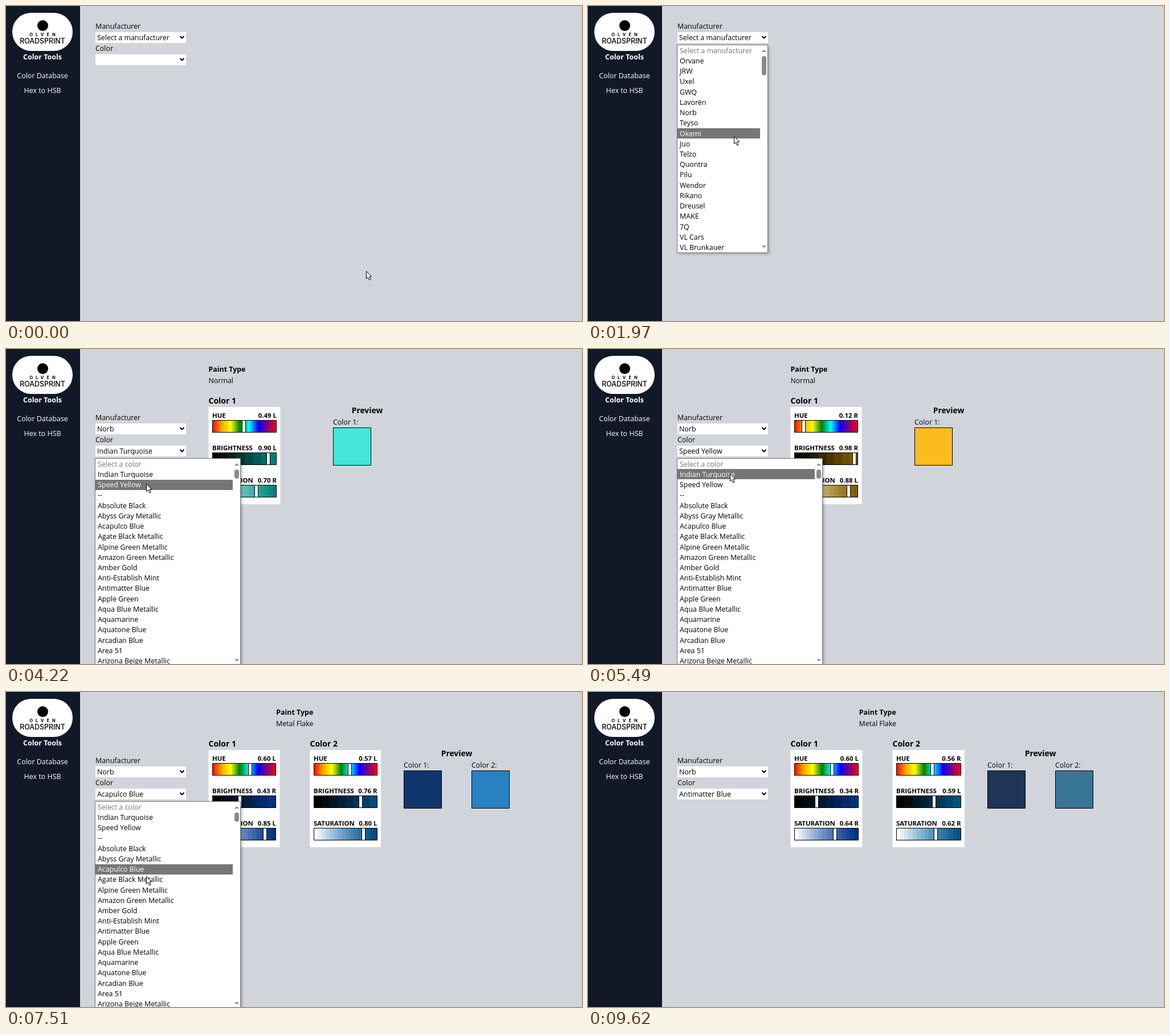
An HTML page with a canvas that plays this animation: 1011x554 px, repeating every 9.64 s.

```html
<!DOCTYPE html>
<html lang="en">
<head>
<meta charset="utf-8">
<title>Color Tools</title>
<style>
  html, body { margin: 0; width: 100%; height: 100%; overflow: hidden; background: #d1d5db; }
  canvas { display: block; }
</style>
</head>
<body>
<canvas id="stage" width="1011" height="554"></canvas>
<script>
const ctx = document.getElementById('stage').getContext('2d');
const LOOP = 9640, STEP = 120, ROW = 18.22, GRAY = '#767676';

const makers = ['Select a manufacturer', 'Orvane', 'JRW', 'Uxel', 'GWQ', 'Lavorën', 'Norb', 'Teyso', 'Okemi',
  'Juo', 'Telzo', 'Quontra', 'Pilu', 'Wendor', 'Rikano', 'Dreusel', 'MAKE', '7Q', 'VL Cars', 'VL Brunkauer'];
const colors = ['Select a color', 'Indian Turquoise', 'Speed Yellow', '--', 'Absolute Black', 'Abyss Gray Metallic',
  'Acapulco Blue', 'Agate Black Metallic', 'Alpine Green Metallic', 'Amazon Green Metallic', 'Amber Gold',
  'Anti-Establish Mint', 'Antimatter Blue', 'Apple Green', 'Aqua Blue Metallic', 'Aquamarine', 'Aquatone Blue',
  'Arcadian Blue', 'Area 51', 'Arizona Beige Metallic'];

// Paints by row in the color list; each coat has a panel width and hue, brightness, saturation
const paints = {
  1: [{ width: 126, hsb: ['0.49 L', '0.90 L', '0.70 R'] }],
  2: [{ width: 125, hsb: ['0.12 R', '0.98 R', '0.88 L'] }],
  6: [{ width: 125, hsb: ['0.60 L', '0.43 R', '0.85 L'] }, { width: 124.5, hsb: ['0.57 L', '0.76 R', '0.80 L'] }],
  12: [{ width: 126, hsb: ['0.60 L', '0.34 R', '0.64 R'] }, { width: 126.5, hsb: ['0.56 R', '0.59 L', '0.62 R'] }]
};

const events = [
  [0, { maker: 0, color: 0, menu: '', focus: '' }],
  [1090, { menu: 'maker' }],
  [2570, { menu: '', focus: 'maker', maker: 6, color: 1 }],
  [3610, { menu: 'color', focus: '' }],
  [4470, { menu: '', focus: 'color', color: 2 }],
  [5250, { menu: 'color', focus: '' }],
  [6130, { menu: '', focus: 'color', color: 6 }],
  [6880, { menu: 'color', focus: '' }],
  [8230, { menu: '', focus: 'color', color: 12 }],
  [9620, { focus: '' }]
];

// Pointer moves: start time, number of steps, end point
const moves = [
  [250, 5, 330, 60], [850, 1, 292, 39], [970, 1, 298, 47],
  [1470, 4, 266, 198], [1970, 1, 256, 229], [2090, 4, 252, 190], [2690, 3, 247, 185],
  [3860, 4, 246, 237], [4720, 2, 244, 227], [4980, 2, 246, 190], [5250, 1, 247, 185],
  [5370, 2, 249, 219], [5610, 1, 249, 251], [5760, 2, 249, 308], [6250, 1, 249, 300],
  [6400, 5, 247, 181], [7130, 2, 246, 289], [7390, 2, 246, 324], [7630, 5, 243, 420], [8730, 2, 461, 487]
];

function pointerAt(t) {
  let x = 632, y = 466;
  for (const [start, steps, endX, endY] of moves) {
    if (t < start) break;
    const done = Math.min(1, (Math.floor((t - start) / STEP) + 1) / steps);
    const eased = Math.sin(done * Math.PI / 2);
    x += (endX - x) * eased;
    y += (endY - y) * eased;
  }
  return { x: Math.round(x), y: Math.round(y) };
}

function stateAt(t) {
  return Object.assign({}, ...events.filter(([start]) => t >= start).map(([, change]) => change));
}

function rect(x, y, w, h, fill) {
  ctx.fillStyle = fill;
  ctx.fillRect(x, y, w, h);
}

function outline(x, y, w, h) {
  ctx.strokeStyle = '#000';
  ctx.lineWidth = 1;
  ctx.strokeRect(x + .5, y + .5, w - 1, h - 1);
}

function pill(x, y, w, h, r, fill) {
  ctx.fillStyle = fill;
  ctx.beginPath();
  ctx.roundRect(x, y, w, h, r);
  ctx.fill();
}

function polygon(points, fill) {
  ctx.beginPath();
  points.forEach(([x, y]) => ctx.lineTo(x, y));
  ctx.closePath();
  ctx.fillStyle = fill;
  ctx.fill();
}

// y is the middle of the capitals
function text(str, x, y, { size = 12.4, weight = 400, color = '#000', align = 'left', family = '"Open Sans"' } = {}) {
  ctx.font = `${weight} ${size}px ${family}, sans-serif`;
  ctx.fillStyle = color;
  ctx.textAlign = align;
  ctx.fillText(str, x, Math.round(y + size * .36));
}

function hsbColor(h, b, s) {
  const channel = n => {
    const k = (n + h * 6) % 6;
    return Math.round(255 * b * (1 - s * Math.max(0, Math.min(k, 4 - k, 1))));
  };
  return `rgb(${channel(5)},${channel(3)},${channel(1)})`;
}

function drawSidebar() {
  rect(0, 0, 130, 554, '#111827');
  pill(11, 12, 106, 67, 33, '#fff');
  pill(55, 25, 19, 19, 9.5, '#000');
  ctx.letterSpacing = '5px';
  text('OLVEN', 66.5, 50, { size: 7.5, weight: 700, align: 'center', family: 'Inter' });
  ctx.letterSpacing = '0px';
  text('ROADSPRINT', 64, 61.5, { size: 12.4, weight: 500, align: 'center', family: 'Inter' });
  const white = { size: 12.5, color: '#fff', align: 'center' };
  text('Color Tools', 64, 89, { ...white, weight: 700 });
  text('Color Database', 64, 122, white);
  text('Hex to HSB', 64, 148.5, white);
}

function drawSelect(label, value, top, focused) {
  text(label, 157, top - 10);
  rect(157, top, 159, 19, '#fff');
  text(value, 160, top + 9.5);
  ctx.strokeStyle = '#000';
  ctx.lineWidth = 2;
  ctx.beginPath();
  ctx.moveTo(305.5, top + 7);
  ctx.lineTo(309, top + 10.5);
  ctx.lineTo(312.5, top + 7);
  ctx.stroke();
  if (focused) {
    ctx.beginPath();
    ctx.roundRect(156, top - 1, 160, 21, 2);
    ctx.stroke();
  }
}

function drawMenu(items, selected, top, right, thumb, pointer) {
  const height = ROW * items.length + 2;
  ctx.save();
  ctx.shadowColor = 'rgba(0,0,0,.35)';
  ctx.shadowBlur = 5;
  ctx.shadowOffsetX = ctx.shadowOffsetY = 1.5;
  rect(156, top, right - 156, height, GRAY);
  ctx.restore();
  rect(157, top + 1, right - 158, height - 2, '#fff');

  const hovered = Math.floor((pointer.y - 4 - top - 1) / ROW);
  const active = hovered > 0 ? hovered : selected;
  items.forEach((item, i) => {
    const y = top + 10.3 + i * ROW;
    const lit = i > 0 && i === active;
    if (lit) rect(157, Math.round(y - ROW / 2), right - 171, 18, GRAY);
    text(item, 161, y, { color: lit ? '#fff' : i ? '#000' : GRAY });
  });

  const x = right - 7, bottom = top + height;
  pill(x - 4, top + 20, 8, thumb, 4, '#8b8b8b');
  polygon([[x - 4, top + 13], [x, top + 9], [x + 4, top + 13]], '#8b8b8b');
  polygon([[x - 4, bottom - 13], [x, bottom - 9], [x + 4, bottom - 13]], '#8b8b8b');
}

function drawSlider(name, value, x, y, w, fillBar) {
  const bold = { size: 11.4, weight: 700 };
  text(name, x, y, bold);
  text(value, x + w, y, { ...bold, align: 'right' });
  const left = Math.round(x), width = Math.round(w), top = y + 8;
  fillBar(left, top, width, 22);
  outline(left, top, width, 22);
  const knob = Math.round(left + parseFloat(value) * (width - 7.5));
  rect(knob, top, 7, 22, '#fff');
  outline(knob, top, 7, 22);
}

function bands(count, shade) {
  return (x, y, w, h) => {
    for (let i = 0; i < count; i++) {
      const from = Math.round(x + w * i / count), to = Math.round(x + w * (i + 1) / count);
      rect(from, y, to - from, h, shade(i / (count - 1)));
    }
  };
}

function rainbow(x, y, w, h) {
  const gradient = ctx.createLinearGradient(x, 0, x + w, 0);
  ['red', 'orange', 'yellow', 'green', 'cyan', 'blue', 'purple', 'red']
    .forEach((color, i) => gradient.addColorStop(i / 7, color));
  rect(x, y, w, h, gradient);
}

function drawPanel(title, { width, hsb }, x) {
  const hue = parseFloat(hsb[0]);
  text(title, x, 90.5, { size: 14, weight: 700 });
  rect(x, 102, width, 171, '#fff');
  const left = x + 6.5, inner = width - 13;
  drawSlider('HUE', hsb[0], left, 117, inner, rainbow);
  drawSlider('BRIGHTNESS', hsb[1], left, 174, inner, bands(8, p => hsbColor(hue, p / 2, 1)));
  drawSlider('SATURATION', hsb[2], left, 231, inner, bands(16, p => hsbColor(hue, 1 - p / 2, p)));
}

function drawPaint(coats) {
  const two = coats.length === 2;
  let x = 355.5, right = x;
  coats.forEach((coat, i) => {
    drawPanel(`Color ${i + 1}`, coat, x);
    right = x + coat.width;
    x = right + 53;
  });

  const typeX = two ? (355.5 + right) / 2 : 355.5, align = two ? 'center' : 'left';
  text('Paint Type', typeX, 36, { weight: 700, align });
  text(two ? 'Metal Flake' : 'Normal', typeX, 56, { align });

  const swatchX = Math.floor(right + (two ? 40 : 93));
  text('Preview', swatchX + (two ? 93 : 60), 107.5, { size: 13.9, weight: 700, align: 'center' });
  coats.forEach(({ hsb }, i) => {
    const sx = swatchX + i * 119;
    text(`Color ${i + 1}:`, sx, 129);
    rect(sx, 138, 67, 67, hsbColor(...hsb.map(parseFloat)));
    outline(sx, 138, 67, 67);
  });
}

function drawPointer({ x, y }) {
  ctx.save();
  ctx.translate(x + .5, y + .5);
  polygon([[0, 0], [0, 13], [3, 10.3], [5.3, 15.5], [7.6, 14.5], [5.3, 9.4], [9.3, 9.4]], '#fff');
  ctx.strokeStyle = '#000';
  ctx.lineWidth = 1;
  ctx.stroke();
  ctx.restore();
}

function draw() {
  const t = performance.now() % LOOP;
  const state = stateAt(t), pointer = pointerAt(t);
  const shift = state.color ? 85 : 0;
  rect(0, 0, 1011, 554, '#d1d5db');
  drawSidebar();
  if (state.color) drawPaint(paints[state.color]);
  drawSelect('Manufacturer', makers[state.maker], 46 + shift, state.focus === 'maker');
  drawSelect('Color', state.color ? colors[state.color] : '', 85 + shift, state.focus === 'color');
  if (state.menu === 'maker') drawMenu(makers, state.maker, 68 + shift, 316, 34, pointer);
  if (state.menu === 'color') drawMenu(colors, state.color, 107 + shift, 412, 16, pointer);
  if (t < 8970) drawPointer(pointer);
  requestAnimationFrame(draw);
}
draw();
</script>
</body>
</html>
```
